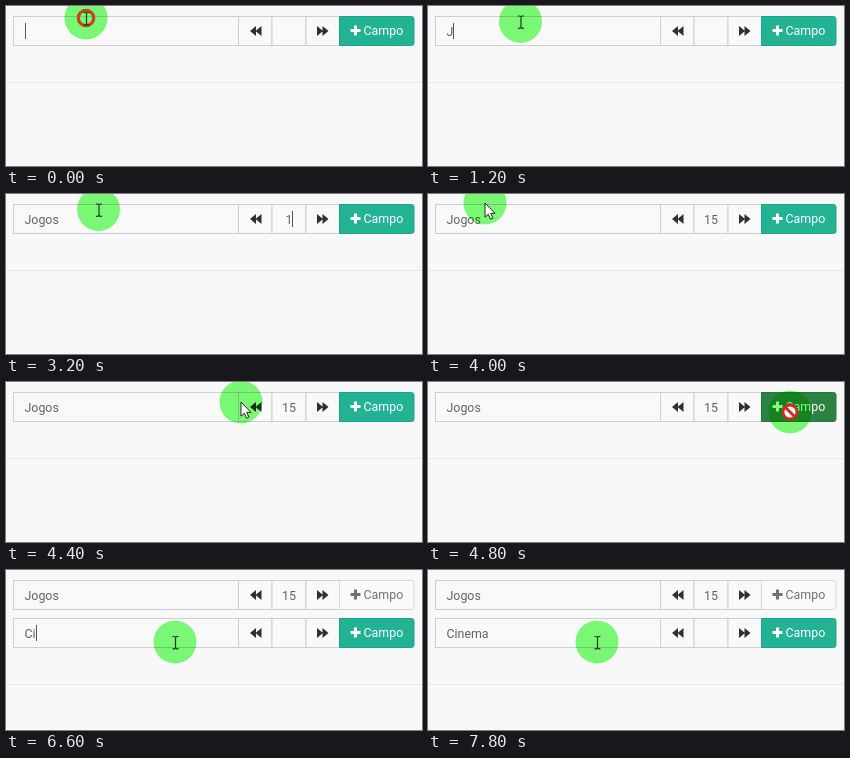
An HTML page for the animation above (8000 ms loop, 416x160 px).

```html
<!DOCTYPE html>
<html lang="pt">
<head>
<meta charset="utf-8">
<title>Campo</title>
<style>
html, body { margin: 0; width: 100%; height: 100%; overflow: hidden; background: #f8f8f8; }
svg { display: block; width: 100%; height: 100%; }
text { font: 12.4px Roboto, Arial, sans-serif; fill: #606264; }
.cell { fill: #f9f9f9; stroke: #cdcfcf; }
.icon { fill: #2e3032; }
.halo { fill: #7dfd78; mix-blend-mode: multiply; }
</style>
</head>
<body>
<svg id="stage" viewBox="0 0 416 160">
  <rect width="416" height="160" fill="#f8f8f8"/>
  <path id="rule" d="M0 0.5H416" stroke="#e6e8e8"/>
  <g id="rows"></g>
  <path id="caret" d="M0 7V23" stroke="#555"/>
  <g id="pointer">
    <circle class="halo" r="21.5"/>
    <circle id="ring" r="7.7" fill="none" stroke="#c8421f" stroke-width="3.2"/>
    <path id="beam" d="M-2.5 -5.5H-.7L.5 -4.8L1.7 -5.5H3.5M.5 -5V6M-2.5 6.8H-.7L.5 6L1.7 6.8H3.5" fill="none" stroke="#263326" stroke-width="1.2"/>
    <path id="arrow" d="M0 0V14.2L3.3 11.2L5.5 16.2L7.9 15.1L5.7 10.3H10Z" fill="#fff" stroke="#222" stroke-width="1"/>
    <g id="denied">
      <circle r="7" fill="#fff" stroke="#cb2a20" stroke-width="2.8"/>
      <path d="M-4.8 -4.8L4.8 4.8" stroke="#cb2a20" stroke-width="3"/>
    </g>
  </g>
</svg>
<script>
const LOOP = 8000, STEP = 200;
const NS = "http://www.w3.org/2000/svg";
const el = id => document.getElementById(id);

function add(parent, tag, attrs) {
  const node = document.createElementNS(NS, tag);
  for (const key in attrs) node.setAttribute(key, attrs[key]);
  return parent.appendChild(node);
}

function makeRow(y) {
  const group = add(el("rows"), "g", { transform: `translate(0 ${y})` });
  const cells = [[7.5, 225], [232.5, 33.5], [266, 34], [300, 33.5]];
  for (const [x, width] of cells) add(group, "rect", { class: "cell", x, y: 0.5, width, height: 29 });
  add(group, "path", { class: "icon", d: "M250 10V20L244 15ZM255.5 10V20L249.5 15Z" });
  add(group, "path", { class: "icon", d: "M311 10V20L317 15ZM316.5 10V20L322.5 15Z" });
  const button = add(group, "path", { d: "M333.5 .5H405.5Q408 .5 408 3V27Q408 29.5 405.5 29.5H333.5Z" });
  const plus = add(group, "path", { d: "M344.5 14.5H354.5M349.5 9.5V19.5", "stroke-width": 3 });
  const label = add(group, "text", { x: 357.5, y: 19 });
  label.textContent = "Campo";
  const name = add(group, "text", { x: 18.5, y: 20 });
  const size = add(group, "text", { x: 283, y: 20, "text-anchor": "middle" });
  return { group, button, plus, label, name, size };
}

const rows = [makeRow(10), makeRow(48)];

const looks = {
  active: ["#22b394", "#1ca486", "#fff"],
  hover: ["#2b8243", "#28743c", "#fff"],
  disabled: ["#fafafa", "#d6d8d8", "#707274"]
};

function setButton(row, look) {
  const [fill, stroke, ink] = looks[look];
  row.button.style.fill = fill;
  row.button.style.stroke = stroke;
  row.plus.style.stroke = ink;
  row.label.style.fill = ink;
}

// time, x, y
const path = [
  [0, 80, 12], [200, 80, 12], [600, 92.5, 15.5], [3800, 92.5, 15.5],
  [4000, 57, 9], [4200, 120, 12], [4400, 235, 20], [4600, 345, 28],
  [4800, 362, 30], [5000, 362, 30], [5200, 300, 56], [5400, 205, 86],
  [5600, 169, 72], [8000, 169, 72]
];

// start time, value
const nameTyping = [[0, ""], [1200, "J"], [1400, "Jog"], [1600, "Jogos"]];
const sizeTyping = [[0, ""], [3200, "1"], [3400, "15"]];
const nextTyping = [[0, ""], [6400, "C"], [6600, "Ci"], [6800, "Cin"], [7000, "Cine"], [7200, "Cinem"], [7400, "Cinema"]];

// from, to, field
const carets = [
  [0, 600, "name"], [1000, 2000, "name"], [2200, 2800, "size"],
  [3000, 3600, "size"], [5800, 6200, "next"], [6400, 7600, "next"]
];

const valueAt = (list, t) => list.filter(item => item[0] <= t).pop()[1];
const during = (t, from, to) => t >= from && t < to;
const show = (node, on) => node.setAttribute("visibility", on ? "visible" : "hidden");

function pointAt(t) {
  const i = path.findIndex(p => p[0] > t);
  const [t0, x0, y0] = path[i - 1], [t1, x1, y1] = path[i];
  // The jump towards the button happens in a single step.
  const k = (t - t0) / (t1 - t0);
  return [x0 + (x1 - x0) * k, y0 + (y1 - y0) * k];
}

function drawCaret(t) {
  const span = carets.find(c => during(t, c[0], c[1]));
  show(el("caret"), !!span);
  if (!span) return;
  const field = { name: rows[0].name, size: rows[0].size, next: rows[1].name }[span[2]];
  const width = field.textContent ? field.getComputedTextLength() : 0;
  const x = span[2] === "size" ? 283 + width / 2 : 18.5 + width;
  const top = span[2] === "next" ? 48 : 10;
  el("caret").setAttribute("transform", `translate(${Math.round(x) + 0.5} ${top})`);
}

function drawPointer(t) {
  const [x, y] = pointAt(t);
  el("pointer").setAttribute("transform", `translate(${x} ${y})`);
  const denied = during(t, 4800, 5200);
  const arrow = during(t, 4000, 4800) || during(t, 5200, 5400);
  show(el("denied"), denied);
  show(el("arrow"), arrow);
  show(el("beam"), !denied && !arrow);
  show(el("ring"), t < 200 || during(t, 5600, 5800));
}

function render(time) {
  const t = Math.floor((time % LOOP) / STEP) * STEP;
  const added = t >= 5000;
  rows[0].name.textContent = valueAt(nameTyping, t);
  rows[0].size.textContent = valueAt(sizeTyping, t);
  rows[1].name.textContent = valueAt(nextTyping, t);
  rows[1].group.setAttribute("display", added ? "inline" : "none");
  setButton(rows[0], added ? "disabled" : t >= 4600 ? "hover" : "active");
  setButton(rows[1], "active");
  el("rule").setAttribute("transform", `translate(0 ${added ? 114 : 76})`);
  drawCaret(t);
  drawPointer(t);
}

const start = performance.now();
function tick() {
  render(performance.now() - start);
  requestAnimationFrame(tick);
}
tick();
</script>
</body>
</html>
```
